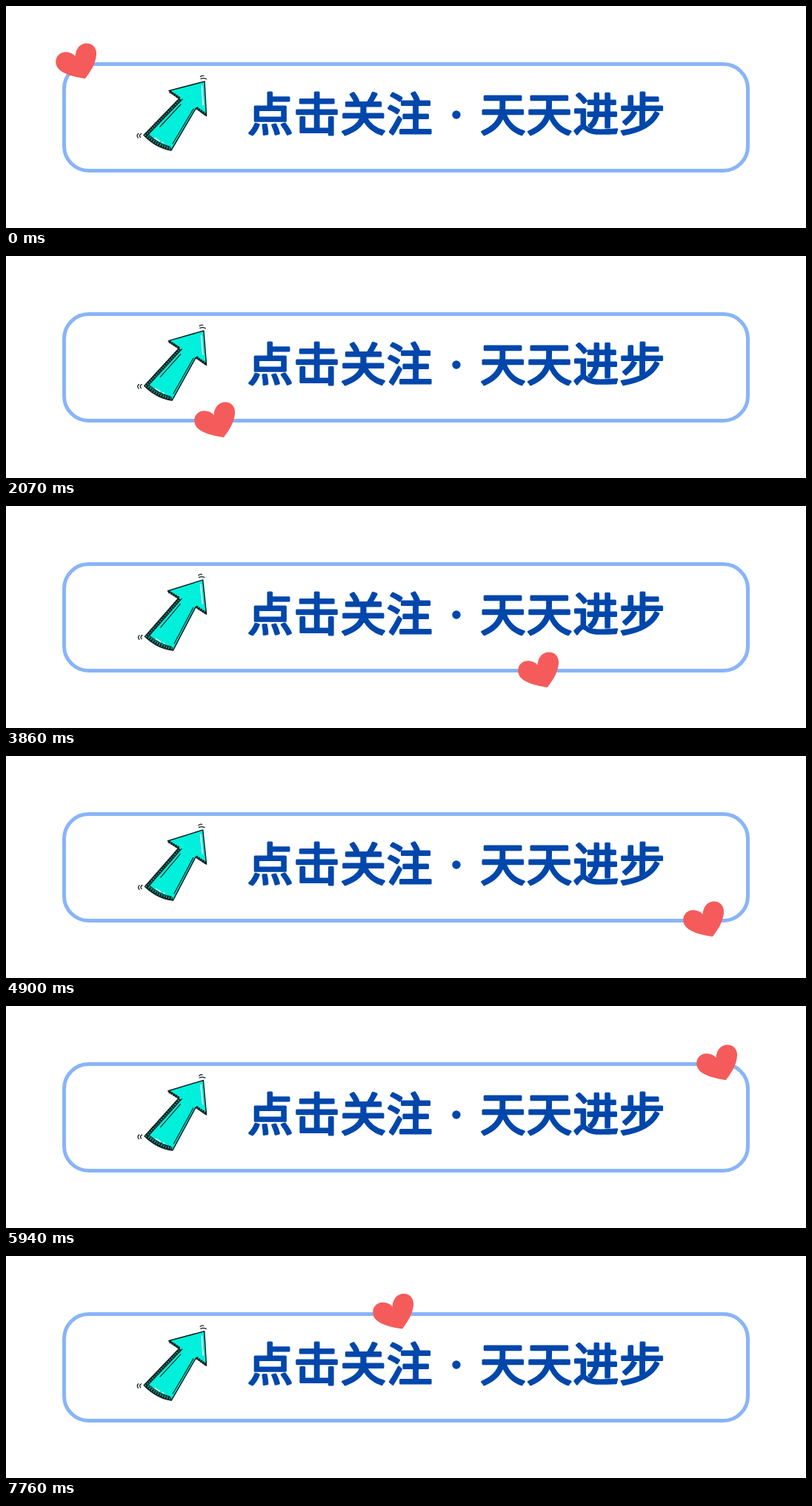
An HTML page that plays this animation: 1080x300 px, repeating every 8 s.

```html
<!DOCTYPE html>
<html lang="zh">
<head>
<meta charset="utf-8">
<style>
html, body { margin: 0; width: 100%; height: 100%; overflow: hidden; background: #fff; }
svg { display: block; width: 100vw; height: 100vh; }
.title {
  font: 400 61.5px "Noto Sans CJK SC", "Noto Sans CJK", "Noto Sans CJK JP", sans-serif;
  letter-spacing: 1.2px;
  fill: #0047ab; stroke: #0047ab; stroke-width: 3; stroke-linejoin: round;
}
.ink { fill: none; stroke: #12201f; stroke-linecap: round; stroke-linejoin: round; }
.hatch { fill: none; stroke: #12201f; stroke-dasharray: 2.6 .8; }
.shine { fill: none; stroke: #fff; stroke-linecap: round; }
</style>
</head>
<body>
<svg viewBox="0 0 1080 300">
  <rect x="78.5" y="78.5" width="923" height="144" rx="33" fill="#fff" stroke="#89b4f8" stroke-width="5"/>
  <g class="title">
    <text x="326" y="168.5">点击关注</text>
    <circle cx="608" cy="147" r="4.2"/>
    <text x="640" y="168.5">天天进步</text>
  </g>
  <g id="arrow">
    <path d="M220 114.5L268 102L270.5 148.5L256.5 138L223 195Q203 192 186 174.5L234 125Z" fill="#00f0dc"/>
    <path class="hatch" stroke-width="4.5" d="M235.500 126L188.500 174.500Q204 189.500 222.500 193"/>
    <path class="hatch" stroke-width="3.500" d="M221 115.500L235 125M257 137.500L270 147"/>
    <path class="ink" stroke-width="1.500" d="M220 114.500L268 102L270.500 148.500L256.500 138L223 195Q203 192 186 174.500L234 125Z"/>
    <path class="ink" stroke-width="1.200" d="M238 126L192 173.500Q206 186.500 221 190M236 133L208 163M253 139L225 186"/>
    <path class="shine" stroke-width="1.600" d="M264.500 108L266 134M201 178.500L207 182.500M211 184.500L212 185"/>
    <path class="ink" stroke-width="1.300" d="M262.500 95.500Q265 93.500 267 94.500M263 98.300Q267 96.800 270.500 98.800M178.800 172.500Q175.500 174.500 178.300 178M182.500 172.500Q179 174.500 181.500 177.500"/>
  </g>
  <path id="heart" fill="#f65b5b" d="M107 98C95 96.500 72 92 68 80C65 70 72 62.500 80 62.300C86 62.200 91 64.500 93.500 68C94 59 99 51.500 107 50.500C117 49.300 123 57 122 66C121 79 113 90 107 98Z"/>
</svg>
<script>
const LOOP = 8000, STEPS = 31, SWING = 33.5, TILT = 3;
const arrow = document.getElementById("arrow");
const heart = document.getElementById("heart");

// step, x offset, y offset along the border
const route = [
  [0, 0, 0], [1, -12, 16], [2, -20, 46], [3, -21, 84], [4, -18, 128],
  [5, 29, 147], [8, 187, 147], [10, 299, 147], [12, 457, 147],
  [15, 624, 147], [19, 847, 146], [20, 892, 139], [21, 904, 93],
  [22, 898, 42], [23, 865, 2], [25, 753, 1], [30, 428, .5]
];

const startOf = k => k * 260 - 10 * Math.min(4, Math.max(0, k - 7));

function stepAt(t) {
  let k = STEPS - 1;
  while (k > 0 && startOf(k) > t) k--;
  return k;
}

function place(k) {
  const i = Math.max(1, route.findIndex(p => p[0] >= k));
  const a = route[i - 1], b = route[i];
  const u = (k - a[0]) / (b[0] - a[0]);
  return [a[1] + (b[1] - a[1]) * u, a[2] + (b[2] - a[2]) * u];
}

function draw(now) {
  const k = stepAt(now % LOOP);
  const [x, y] = place(k);
  const angle = -TILT * (1 - Math.cos(2 * Math.PI * k / SWING)) / 2;
  heart.setAttribute("transform", `translate(${x} ${y})`);
  arrow.setAttribute("transform", `rotate(${angle} 225 146)`);
}

const begin = performance.now();
function tick() {
  draw(performance.now() - begin);
  requestAnimationFrame(tick);
}
tick();
</script>
</body>
</html>
```
